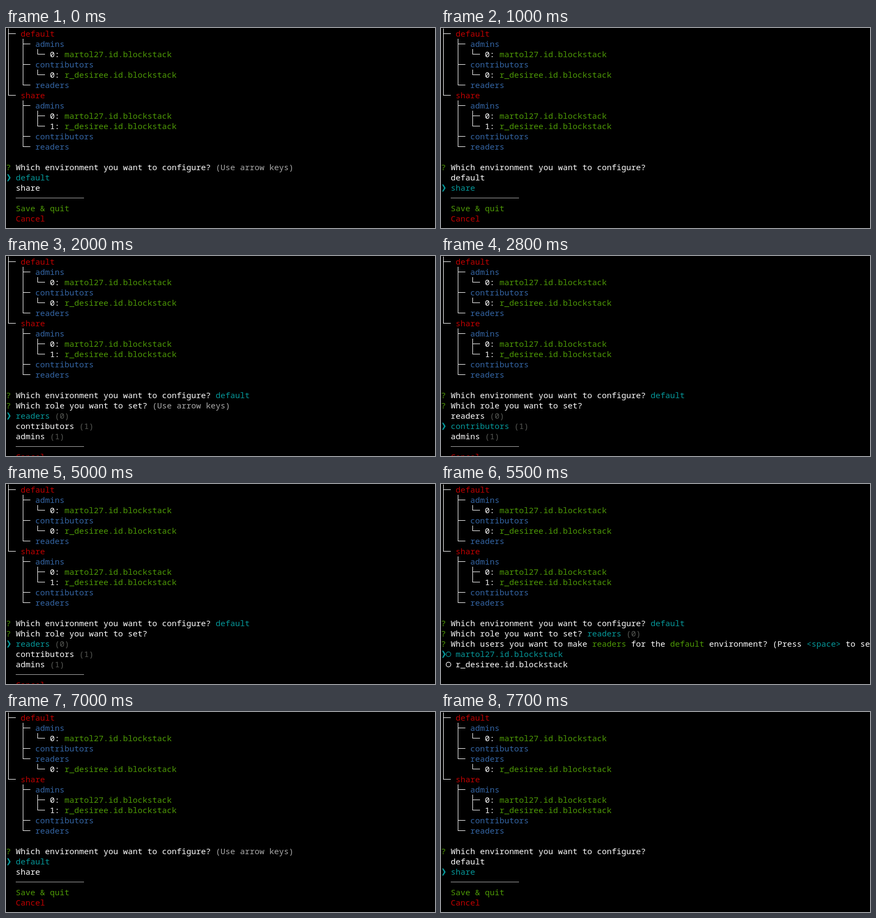
An HTML page for the animation above (8000 ms loop, 792 px wide and 370 px high).

```html
<!DOCTYPE html>
<html lang="en">
<head>
<meta charset="utf-8">
<title>Role prompt</title>
<style>
  html, body { margin: 0; width: 100%; height: 100%; overflow: hidden; background: #000; }
  svg { display: block; }
  text { font: 15px "Noto Sans Mono", "DejaVu Sans Mono", monospace; white-space: pre; }
  .scene { visibility: hidden; }
  .scene.on { visibility: visible; }
  .line { fill: none; shape-rendering: crispEdges; }
</style>
</head>
<body>
<svg id="term" width="792" height="370" viewBox="0 0 792 370"></svg>
<script>
const COL = 9, ROW = 19, LOOP = 8000;
const COLORS = {
  w: '#fff', d: '#aaa', k: '#555753', r: '#c00000',
  g: '#4e9a06', b: '#3465a4', c: '#06989a'
};

// Glyphs drawn inside one 9 x 19 cell
const LINES = {
  '│': 'M4.5 0V19',
  '├': 'M4.5 0V19M4.5 9.5H9',
  '└': 'M4.5 0V10M4.5 9.5H9',
  '─': 'M0 9.5H9'
};
const ring = (r) => `M${4.8 - r} 10a${r} ${r} 0 1 0 ${2 * r} 0a${r} ${r} 0 1 0 ${-2 * r} 0z`;
const SOLIDS = {
  '❯': 'M2 3.6H4.5L8.6 10L4.5 16.4H2L5.5 10Z',
  '○': ring(4.9) + ring(3.7),
  '◉': ring(5.1) + ring(4.1) + ring(3)
};

const term = document.getElementById('term');

function add(parent, tag, attrs) {
  const el = document.createElementNS('http://www.w3.org/2000/svg', tag);
  for (const key in attrs) el.setAttribute(key, attrs[key]);
  return parent.appendChild(el);
}

function drawRun(g, str, col, row, color) {
  if (!LINES[str[0]] && !SOLIDS[str[0]]) {
    add(g, 'text', { x: col * COL, y: row * ROW + 16, fill: color }).textContent = str;
    return;
  }
  [...str].forEach((ch, i) => {
    const transform = `translate(${(col + i) * COL} ${row * ROW + 1})`;
    if (LINES[ch]) add(g, 'path', { d: LINES[ch], transform, class: 'line', stroke: color });
    else add(g, 'path', { d: SOLIDS[ch], transform, fill: color, 'fill-rule': 'evenodd' });
  });
}

// Markup: x{text} is a run in colour x; a bare space skips one column
function drawLine(g, line, row) {
  let col = 0;
  for (const [, key, str] of line.matchAll(/([a-z])\{([^}]*)\}| /g)) {
    if (!key) { col++; continue; }
    drawRun(g, str, col, row, COLORS[key]);
    col += str.length;
  }
}

const ann = 'martol27.id.blockstack';
const bea = 'r_desiree.id.blockstack';
const hint = ' d{(Use arrow keys)}';
const rule = `  d{${'─'.repeat(14)}}`;

const user = (branch, id, name, bar = '│') =>
  `w{${bar === '│' ? '│' : ' '}}`.replace('w{ }', ' ') + `  ${bar === '│' || bar === ' │' ? 'w{│}' : ' '}  w{${branch}─} w{${id}:} g{${name}}`;

function tree(moved) {
  const role = (bar, branch, name) => `${bar}  w{${branch}─} b{${name}}`;
  const entry = (bar, mid, branch, id, name) =>
    `${bar}  ${mid}  w{${branch}─} w{${id}:} g{${name}}`;
  const v = 'w{│}';
  const tail = moved
    ? [role(v, '└', 'readers'), entry(v, ' ', '└', 0, bea)]
    : [entry(v, v, '└', 0, bea), role(v, '└', 'readers')];
  return [
    'w{├─} r{default}',
    role(v, '├', 'admins'),
    entry(v, v, '└', 0, ann),
    role(v, '├', 'contributors'),
    ...tail,
    'w{└─} r{share}',
    role(' ', '├', 'admins'),
    entry(' ', v, '├', 0, ann),
    entry(' ', v, '└', 1, bea),
    role(' ', '├', 'contributors'),
    role(' ', '└', 'readers'),
    ''
  ];
}

const option = (name, on, extra = '') =>
  (on ? `c{❯} c{${name}}` : `  w{${name}}`) + extra;

const askEnv = 'g{?} w{Which environment you want to configure?}';
const askRole = 'g{?} w{Which role you want to set?}';

const envMenu = (pick, tip = '') => [
  askEnv + tip,
  ...['default', 'share'].map((name, i) => option(name, i === pick)),
  rule,
  '  g{Save & quit}',
  '  r{Cancel}'
];

const roleMenu = (pick, tip = '') => [
  askEnv + ' c{default}',
  askRole + tip,
  ...['readers', 'contributors', 'admins'].map((name, i) =>
    option(name, i === pick, ` k{(${Math.min(i, 1)})}`)),
  rule,
  '  r{Cancel}'
];

const userMenu = (pick, checked, tip = '') => [
  askEnv + ' c{default}',
  askRole + ' c{readers} k{(0)}',
  'g{?} w{Which users you want to make} g{readers} w{for the} g{default} w{environment?}' + tip,
  ...[ann, bea].map((name, i) => {
    const tone = i === pick ? 'c' : 'w';
    const mark = i === checked ? 'g{◉}' : `${tone}{○}`;
    return `${i === pick ? 'c{❯}' : ' '}${mark} ${tone}{${name}}`;
  })
];
const pressHint = ' w{(Press} c{<space>} w{to select,} c{<a>} w{to toggle all)}';

const before = tree(false), after = tree(true);
const scenes = [
  [0, before, envMenu(0, hint)],
  [1000, before, envMenu(1)],
  [1100, before, envMenu(0)],
  [2000, before, roleMenu(0, hint)],
  [2800, before, roleMenu(1)],
  [5000, before, roleMenu(0)],
  [5500, before, userMenu(0, -1, pressHint)],
  [5600, before, userMenu(1, -1, pressHint)],
  [6300, before, userMenu(1, 1)],
  [7000, after, envMenu(0, hint)],
  [7700, after, envMenu(1)]
].map(([start, top, menu]) => {
  const g = add(term, 'g', { class: 'scene' });
  [...top, ...menu].forEach((line, row) => drawLine(g, line, row));
  return { start, g };
});

let shown;
function tick() {
  const t = (performance.now() - origin) % LOOP;
  const now = scenes.findLast((s) => s.start <= t) || scenes[0];
  if (now !== shown) {
    if (shown) shown.g.classList.remove('on');
    now.g.classList.add('on');
    shown = now;
  }
  requestAnimationFrame(tick);
}
const origin = performance.now();
tick();
</script>
</body>
</html>
```
